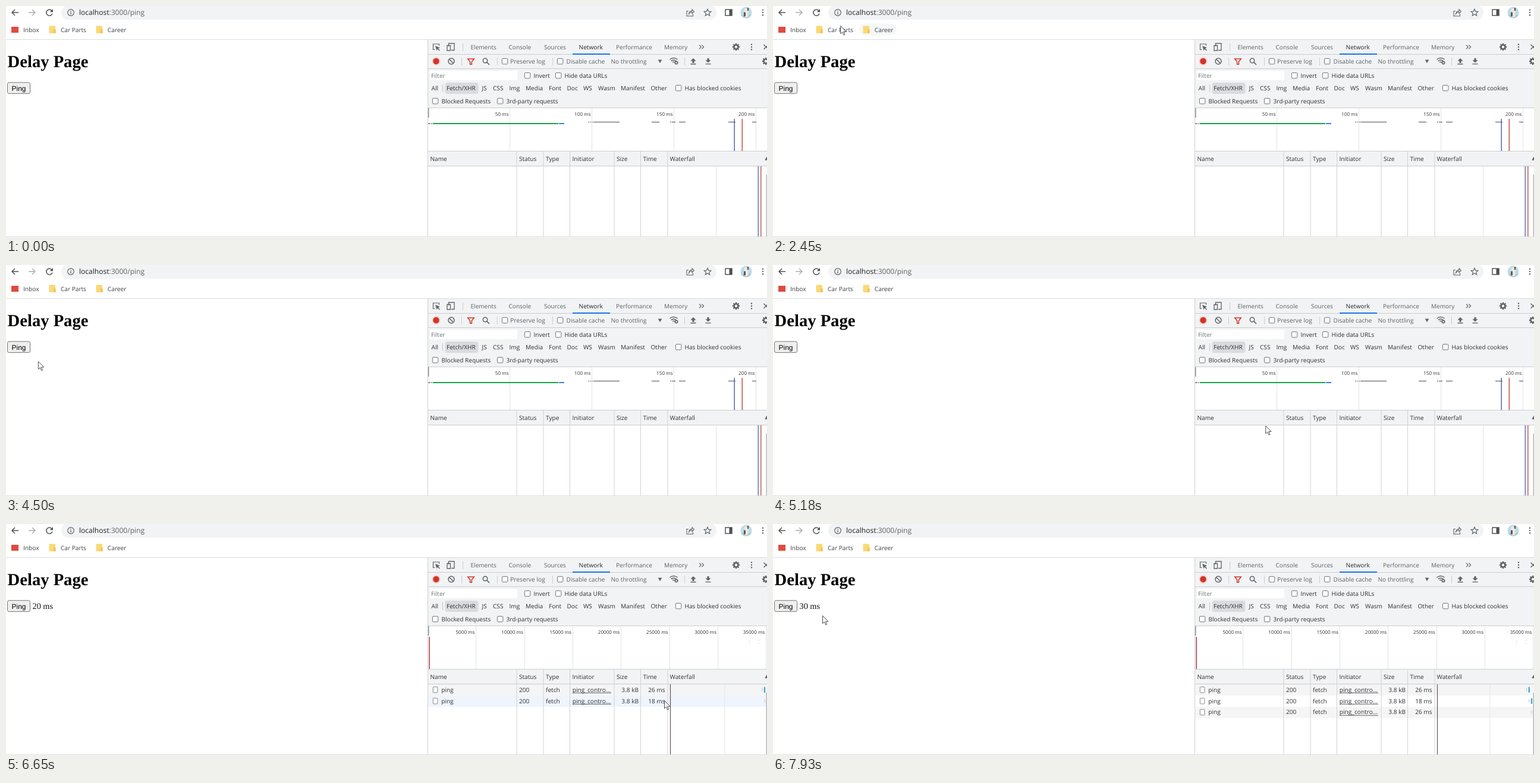
An HTML page with a canvas that plays this animation: 1280x389 px, repeating every 8000 ms.

```html
<!DOCTYPE html>
<html lang="en">
<head>
<meta charset="utf-8">
<title>Ping</title>
<style>
html, body { margin: 0; width: 100%; height: 100%; overflow: hidden; background: #fff; }
canvas { display: block; width: 1280px; height: 389px; }
</style>
</head>
<body>
<canvas id="stage"></canvas>
<script>
const W = 1280, H = 389, LOOP = 8000, STEP = 1000 / 15;
const canvas = document.getElementById('stage');
const dpr = window.devicePixelRatio || 1;
canvas.width = W * dpr;
canvas.height = H * dpr;
const c = canvas.getContext('2d');
c.scale(dpr, dpr);
c.textRendering = 'geometricPrecision';

const UI = '"Open Sans", "Noto Sans", sans-serif';
const SERIF = '"Liberation Serif", "Times New Roman", serif';
const SANS = '"Liberation Sans", Arial, sans-serif';
const INK = '#303135', ICON = '#5f6368', BAR = '#f1f3f4', LINE = '#cbcdd1', RED = '#d23527';

// Pointer moves in bursts, each sampled at 15 steps a second.
const BURSTS = [720, 1530, 2390, 3220, 3830, 4090, 4430, 5250, 6060, 6920, 7730];
const PATH = [ // time, x, y
  [720, 430, 376], [1187, 298, 145], [1390, 226, 14], [1530, 200, 12],
  [1640, 120, 60], [1850, 12, 112], [2060, 90, 108], [2320, 178, 40],
  [2390, 150, 36], [2457, 113, 33], [2680, 38, 100], [2850, 24, 110],
  [3160, 38, 50], [3430, 19, 146], [3830, 18, 143], [3897, 17, 139],
  [4400, 17, 139], [4430, 30, 148], [4497, 54, 162], [4800, 420, 235],
  [5180, 847, 272], [5250, 856, 273], [5717, 900, 278], [6060, 945, 283],
  [6660, 1107, 297], [6900, 1098, 296], [7120, 820, 276], [7387, 443, 236],
  [7660, 157, 151], [7730, 138, 150], [7930, 83, 154]
];
const PINGS = [[5300, 31, 26], [6300, 20, 18], [7300, 30, 26]]; // time, shown ms, logged ms

function text(s, x, y, size = 10.1, color = INK, align = 'left', face = UI, weight = '') {
  c.font = `${weight} ${size}px ${face}`;
  c.textAlign = align;
  c.fillStyle = color;
  c.fillText(s, x, y);
}
function rect(x, y, w, h, color) {
  c.fillStyle = color;
  c.fillRect(x, y, w, h);
}
function pill(x, y, w, h, r, fill, edge) {
  c.beginPath();
  c.roundRect(x, y, w, h, r);
  if (fill) { c.fillStyle = fill; c.fill(); }
  if (edge) { c.strokeStyle = edge; c.lineWidth = 1; c.stroke(); }
}
const vline = (x, y, h, color = LINE, w = 1) => rect(x, y, w, h, color);
const hline = (x, y, w, color = LINE, h = 1) => rect(x, y, w, h, color);

function disc(x, y, r, color) {
  c.beginPath();
  c.arc(x, y, r, 0, 7);
  c.fillStyle = color;
  c.fill();
}
// Small icons are path strings around their centre.
function icon(x, y, d, color = ICON, width = 1.3, fill = false) {
  c.save();
  c.translate(x, y);
  const p = new Path2D(d);
  if (fill) {
    c.fillStyle = color;
    c.fill(p);
  } else {
    c.strokeStyle = color;
    c.lineWidth = width;
    c.stroke(p);
  }
  c.restore();
}
function ring(x, y, r, color = ICON, width = 1.3) {
  c.beginPath();
  c.arc(x, y, r, 0, 7);
  c.strokeStyle = color;
  c.lineWidth = width;
  c.stroke();
}
function gear(x, y, r) {
  for (let i = 0; i < 8; i++) {
    c.save();
    c.translate(x, y);
    c.rotate(i * Math.PI / 4);
    rect(-1.2, -r - 1.6, 2.4, 3, ICON);
    c.restore();
  }
  ring(x, y, r - 1.1, ICON, 2.4);
}
function dots(x, y, color = ICON) {
  for (const d of [-4.3, 0, 4.3]) disc(x, y + d, 1.2, color);
}
function check(x, y, label = '') {
  pill(x - 4.6, y - 4.6, 9.4, 9.4, 1.5, '#fff', '#70757a');
  text(label, x + 10.5, y + 4);
}

function hoverAlpha(t, x0, x1) {
  // Fades after the pointer enters or leaves a bookmark.
  let a = 0;
  for (let k = 1; k < 4; k++) {
    const [x, y] = pointer(t - k * 50);
    if (t - k * 50 > 720 && y > 28 && y < 52 && x > x0 && x < x1) a += 1 / 3;
  }
  return a;
}

function browserBar(t, px, py) {
  const over = t >= 720 && py < 24 && px > 93 && px < 1195;
  pill(93, -1, 1102, 24, 12, over ? '#e8eaed' : BAR);
  icon(15, 11, 'M6 0H-5M0 -5L-5 0L0 5', '#4d5156', 1.5);
  icon(44, 11, 'M-6 0H5M0 -5L5 0L0 5', '#a9acb0', 1.4);
  icon(73, 11, 'M4.2 -3A5.2 5.2 0 1 0 5 1.7', '#4d5156', 1.5);
  icon(73, 11, 'M6 -6V-.7H.8Z', '#4d5156', 1, true);
  ring(109, 11, 5.3, ICON, 1.2);
  rect(108.4, 10.2, 1.3, 3.8, ICON);
  rect(108.4, 7.8, 1.3, 1.4, ICON);
  text('localhost', 123, 15.1, 12.05, '#202124');
  const w = c.measureText('localhost').width;
  text(':3000/ping', 123 + w, 15.1, 12.05, ICON);

  icon(1151, 11, 'M-3 -2.5H-6V6H4.5V2.5M-2.5 2.5C-2 -1 0 -2.6 3 -2.6V-5.4L6.4 -1.8L3 1.6V-.8C0 -.8 -1.2 .3 -2.5 2.5Z', ICON, 1.1);
  icon(1180, 11, 'M0 -5.8L1.7 -1.9L5.8 -1.6L2.7 1.1L3.7 5.2L0 3L-3.7 5.2L-2.7 1.1L-5.8 -1.6L-1.7 -1.9Z', ICON, 1.2);
  icon(1215.5, 11, 'M-5.5 -5H5.5V5H-5.5Z', '#4d5156', 1.5);
  rect(1216.5, 6, 4.5, 10, '#4d5156');
  disc(1245, 11, 9.6, '#b9dcef');
  c.save();
  c.beginPath();
  c.arc(1245, 11, 9.6, 0, 7);
  c.clip();
  rect(1235, 15, 20, 6, '#a9c9d8');
  pill(1241.5, 4, 7, 15, 3, '#eee9e1');
  rect(1241, 10.5, 3, 7, '#68574c');
  rect(1246.8, 3, 2.4, 5, '#68574c');
  c.restore();
  dots(1273, 11);

  for (const [x0, x1] of [[2, 62], [66, 141], [145, 208]]) {
    const a = hoverAlpha(t, x0, x1);
    if (a) pill(x0, 29.5, x1 - x0, 20, 10, `rgba(241,243,244,${a})`);
  }
  rect(9, 35, 12, 10, '#e04a3f');
  for (const x of [72.5, 151.5]) {
    pill(x, 33.5, 10.5, 12.5, 1, '#fbd877');
    rect(x + 7.5, 39.5, 3.7, 6.5, '#f3c64f');
  }
  text('Inbox', 29, 43.5, 10.2, '#3c4043');
  text('Car Parts', 92, 43.5, 10.1, '#3c4043');
  text('Career', 170.8, 43.5, 10.2, '#3c4043');
  hline(0, 56, W, '#d9dbde');
}

function page(t, px, py, ping) {
  text('Delay Page', 2.6, 103, 28.6, '#000', 'left', SERIF, 'bold');
  const over = t >= 720 && px >= 2 && px <= 41 && py >= 128 && py <= 148;
  const down = t >= 4090 && t < 4230;
  pill(2.5, 128.8, 38, 18.6, 2.5, down ? '#f5f5f5' : over ? '#e5e5e5' : '#efefef',
    down ? '#8d8d8d' : over ? '#4f4f4f' : '#767676');
  text('Ping', 9.6, 142.9, 11.9, '#000', 'left', SANS);
  if (ping) text(`${ping[1]} ms`, 44.5, 142.8, 14.3, '#101018', 'left', SERIF);
}

function toolsHead() {
  rect(709, 57, 571, 115, BAR);
  for (const y of [81, 105, 171]) hline(709, y, 571);
  icon(724, 69, 'M4.5 -2V-5H-5.5V4.5H-2.5', ICON, 1.2);
  icon(724, 69, 'M-2 -2L6 1.2L3 2.4L6 5.4L4.8 6.6L1.9 3.6L.6 6.2Z', ICON, 1, true);
  icon(748, 69, 'M-3.5 -1V-6H6V5.5H1M-6 -2.5H-.5V6H-6Z', ICON, 1.3);
  vline(768, 63, 13);
  [['Elements', 781.5], ['Console', 845.5], ['Sources', 905], ['Performance', 1026], ['Memory', 1107]]
    .forEach(([s, x]) => text(s, x, 73.3, 10.05, ICON));
  text('Network', 963.5, 73.3, 10.15, '#27282b');
  rect(953, 80, 63, 2, '#1a73e8');
  icon(1170, 69, 'M-4 -3.3L-.8 0L-4 3.3M.4 -3.3L3.6 0L.4 3.3', ICON, 1.2);
  gear(1228, 69, 4.5);
  dots(1254, 69);
  icon(1278.5, 69, 'M-4 -4L4 4M4 -4L-4 4', ICON, 1.5);

  disc(723.5, 93, 7.2, '#f4d5d2');
  disc(723.5, 93, 5.2, RED);
  ring(749, 93, 5, ICON, 1.5);
  icon(749, 93, 'M-3.5 -3.5L3.5 3.5', ICON, 1.5);
  icon(782, 93.5, 'M-5.3 -4.5H5.3L1.4 .3V4.8H-1.4V.3Z', RED, 1.5);
  ring(806, 92, 3.7, ICON, 1.5);
  icon(806, 92, 'M2.7 2.7L7 7', ICON, 1.7);
  for (const x of [766, 826, 919, 1141]) vline(x, 87, 13);
  check(839, 93);
  text('Preserve log', 848, 97, 10.3, ICON);
  check(932, 93);
  text('Disable cache', 942.5, 97, 10.15, ICON);
  text('No throttling', 1017.5, 97, 10.1, ICON);
  icon(1100, 93, 'M-3.3 -2.5H3.3L0 3.2Z', ICON, 1, true);
  icon(1123, 92, 'M-6.5 -2Q0 -7 6.5 -2M-4.2 .6Q0 -2.8 4.2 .6M-1.8 3Q0 1.5 1.5 2.8', ICON, 1.5);
  ring(1127.5, 95.5, 2.2, ICON, 1.7);
  icon(1156, 93, 'M0 -5L4.6 -.4H1.6V3H-1.6V-.4H-4.6ZM-4.6 4.1H4.6V5.4H-4.6Z', ICON, 1, true);
  icon(1181, 93, 'M0 2.5L4.6 -1.8H1.6V-5H-1.6V-1.8H-4.6ZM-4.6 3.9H4.6V5.2H-4.6Z', ICON, 1, true);
  gear(1278, 93, 4.5);

  rect(713, 109, 147, 16, '#fff');
  text('Filter', 715, 121, 10.1, '#70757a');
  check(877, 117, 'Invert');
  check(929, 117, 'Hide data URLs');
  pill(738.5, 129, 56, 19, 4, '#d9dbdf');
  vline(734, 132, 13, '#bfc2c6');
  [['All', 715.5], ['Fetch/XHR', 741], ['JS', 800.5], ['CSS', 819], ['Img', 846.5], ['Media', 874],
    ['Font', 913], ['Doc', 943.5], ['WS', 971], ['Wasm', 996], ['Manifest', 1034], ['Other', 1084.5]]
    .forEach(([s, x]) => text(s, x, 142.3, 10.1));
  check(1131, 138, 'Has blocked cookies');
  check(722, 160, 'Blocked Requests');
  check(831, 160, '3rd-party requests');
}

function overview(count) {
  if (!count) {
    for (let i = 1; i < 5; i++) {
      const x = 709 + i * 138;
      vline(x, 172, 72, '#e3e4e6');
      text(`${i * 50} ms`, x - 1.5, 185, 8.1, INK, 'right');
    }
    rect(710, 197, 4, 2, '#999');
    rect(715, 197, 2, 2, '#999');
    rect(718, 197, 211, 2, '#17a34a');
    rect(930, 197, 9, 2, '#3c7fe0');
    for (const x of [979, 982, 985]) rect(x, 194.5, 2, 2, '#aaa');
    [[988, 44], [1086, 13], [1117, 2], [1120, 6], [1132, 11], [1215, 12], [1255, 7]]
      .forEach(([x, w]) => rect(x, 194.5, w, 2, '#999'));
    vline(1224.5, 190, 54, '#3b4cab', 1.3);
    vline(1237.6, 190, 54, '#c0392b', 1.3);
  } else {
    for (let i = 1; i < 8; i++) {
      const x = 709 + i * 81.3;
      vline(Math.round(x), 172, 72, '#e3e4e6');
      text(`${i * 5000} ms`, x - 1.8, 185, 8.1, INK, 'right');
    }
    vline(711.4, 190, 54, '#b8343a', 1.5);
    for (let i = 0; i < Math.min(count, 2); i++) {
      rect(1250 + i * 16, 195, 1, 2, '#d5d7d9');
      rect(1250 + i * 16, 200, 1, 2, '#d5d7d9');
    }
  }
  rect(709.5, 172, 2, 16, '#8f9296');
}

function row(i, count, hovered) {
  const y = 270 + i * 18.9, base = y + 12.6;
  rect(710, y, 570, 18.9, hovered ? '#eff4fd' : i % 2 ? '#fff' : '#f5f5f5');
  pill(718.3, y + 4.4, 7.6, 9.6, 1, '#fff', '#85898e');
  text('ping', 732.3, base);
  text('200', 863, base);
  text('fetch', 908, base);
  text('ping_contro…', 952.7, base, 10.2);
  hline(953, base + 1.4, 65, '#55575b', .9);
  text('3.8 kB', 1064, base, 10.1, INK, 'right');
  text(`${PINGS[i][2]} ms`, 1108.5, base, 10.1, INK, 'right');
  const age = count - 1 - i;
  if (age) {
    const x = 1279.4 - age * 4.3;
    rect(x - 4, y + 6.5, 1.2, 5, '#c4c6c9');
    rect(x - .2, y + 4.5, 2.2, 9.5, '#3da3dc');
  } else {
    rect(1275.5, y + 6.5, 1, 5, '#c0c3c6');
  }
}

function table(px, py, count) {
  rect(709, 244, 571, 25, BAR);
  for (let i = 0; i < count; i++) {
    const y = 270 + i * 18.9;
    row(i, count, px > 709 && py >= y && py < y + 18.9);
  }
  hline(709, 244, 571);
  hline(709, 269, 571);
  for (const x of [858.5, 903.5, 948, 1022.5, 1067, 1112.5]) vline(x, 245, 144, '#cfd1d5');
  [['Name', 713.5], ['Status', 863], ['Type', 908], ['Initiator', 952.5], ['Size', 1027],
    ['Time', 1071.5], ['Waterfall', 1116.5]].forEach(([s, x]) => text(s, x, 261.3, 10.1));
  icon(1279.5, 257, 'M-3.2 2.8H3.2L0 -3.2Z', ICON, 1, true);
  if (!count) {
    vline(1194, 270, 119, '#e3e4e6');
    vline(1264.6, 270, 119, '#4a67a8', 1.3);
    vline(1269.2, 270, 119, '#b5483f', 1.3);
  } else {
    vline(1214 - count * 2.8, 270, 119, '#e3e4e6');
    if (count === 1) {
      vline(1116.5, 270, 119, '#4a3f86', 1);
      vline(1117.5, 270, 119, '#a3303a', 1.3);
    } else {
      vline(1116.9, 270, 119, '#63555c', 1.2);
    }
  }
  rect(1278.5, 284, 1.5, 105, '#b5b7ba');
  vline(709, 57, 332, '#cfd1d4');
}

function pointer(t) {
  const start = BURSTS.filter(b => b <= t).pop() || 0;
  const s = start + Math.floor((t - start) / STEP + .2) * STEP;
  let i = 1;
  while (i < PATH.length - 1 && PATH[i][0] < s) i++;
  const [t0, x0, y0] = PATH[i - 1], [t1, x1, y1] = PATH[i];
  const k = Math.max(0, Math.min(1, (s - t0) / (t1 - t0)));
  return [x0 + (x1 - x0) * k, y0 + (y1 - y0) * k];
}

function arrow(x, y) {
  const d = 'M.5 .5V13.6L3.6 10.8L5.7 15.8L7.7 15L5.6 10.1H9.8Z';
  icon(x, y, d, '#fff', 1, true);
  icon(x, y, d, '#3a3a3f', .9);
}

function draw(t) {
  const [px, py] = pointer(t);
  const done = PINGS.filter(p => t >= p[0]);
  rect(0, 0, W, H, '#fff');
  browserBar(t, px, py);
  page(t, px, py, done[done.length - 1]);
  toolsHead();
  overview(done.length);
  table(px, py, done.length);
  hline(0, 388, W, '#dcdee0');
  if (t >= 720) arrow(px, py);
}

const begin = performance.now();
function frame() {
  draw((performance.now() - begin) % LOOP);
  requestAnimationFrame(frame);
}
frame();
</script>
</body>
</html>
```
